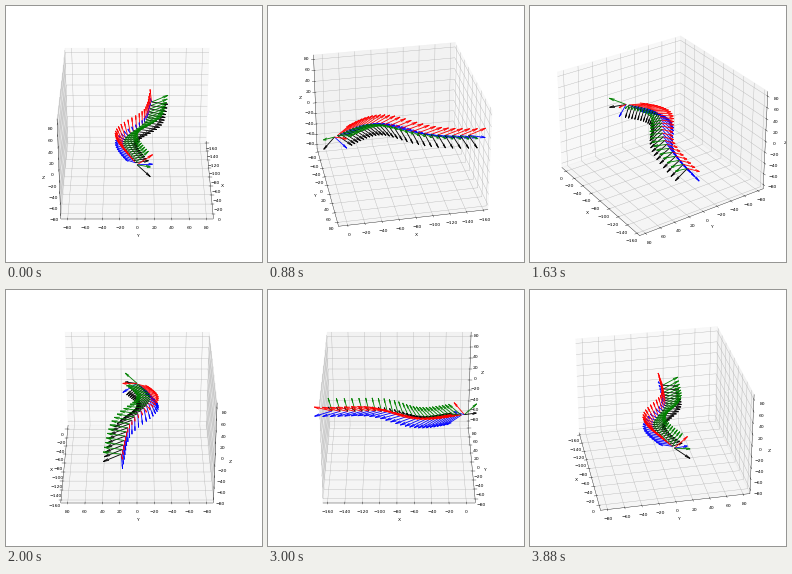
A matplotlib script for the animation above (4.01 s loop, 256 by 256 pixels).

```python
import numpy as np
import matplotlib.pyplot as plt
from matplotlib.animation import FuncAnimation

FRAMES, INTERVAL_MS = 32, 125
POSES = 28
HALF_W, HALF_H, DEPTH = 13.5, 8.5, 16.3

# Corner rays of each view: colour, side, height
CORNERS = [("red", -1, 1), ("green", 1, 1), ("blue", -1, -1), ("black", 1, -1)]


def camera_poses():
    """Positions and headings along a path that swerves once and then straightens."""
    u = np.linspace(0, 1, POSES)
    s = u * (0.65 + 0.35 * u**2)
    x = -158 * s
    y = s * (18 - 102 * np.exp(-(s / 0.42) ** 3))
    z = -0.8 + 5.8 * np.cos(2 * np.pi * (s - 0.3) / 1.4)
    yaw = 42 + 13 * s + 42 * np.exp(-(s / 0.38) ** 3)
    yaw[0] = -6
    return zip(x, y, z, np.radians(yaw))


def draw_camera(ax, x, y, z, yaw):
    forward = DEPTH * np.array([-np.sin(yaw), np.cos(yaw), 0])
    right = HALF_W * np.array([np.cos(yaw), np.sin(yaw), 0])
    up = np.array([0, 0, HALF_H])
    for color, side, height in CORNERS:
        ray = forward + side * right + height * up
        ax.quiver(x, y, z, *ray, color=color, linewidth=1.9)


fig = plt.figure(figsize=(8, 8), dpi=32)
ax = fig.add_axes([0.05, 0.05, 0.9, 0.9], projection="3d")
for pose in camera_poses():
    draw_camera(ax, *pose)

ax.set(xlim=(-165.5, 10.5), ylim=(-88, 88), zlim=(-88, 88),
       xlabel="X", ylabel="Y", zlabel="Z",
       xticks=range(-160, 1, 20), yticks=range(-80, 81, 20),
       zticks=range(-80, 81, 20))


def update(i):
    ax.view_init(elev=30, azim=360 * i / FRAMES)
    return []


anim = FuncAnimation(fig, update, frames=FRAMES, interval=INTERVAL_MS,
                     repeat=True, repeat_delay=0)
plt.show()
```
